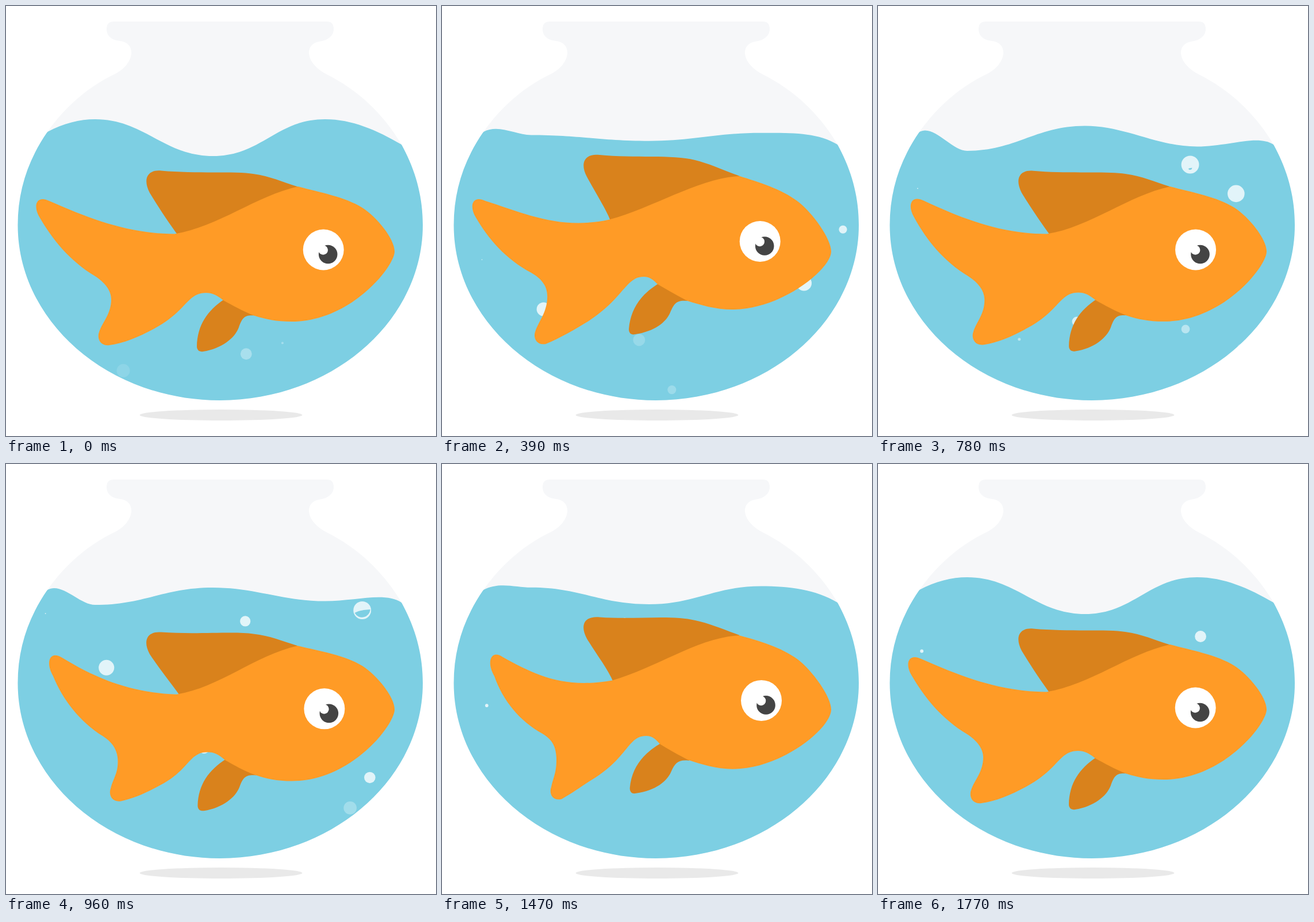
An HTML page that plays this animation: 748 by 748 pixels, repeating every 1.8 s.

```html
<!DOCTYPE html>
<html lang="en">
<head>
<meta charset="utf-8">
<title>Goldfish bowl</title>
<style>
  html, body { margin: 0; width: 100%; height: 100%; overflow: hidden; background: #fff; }
  svg { display: block; width: 100vw; height: 100vh; }
  .water { fill: #7dcfe3; }
  .fin { fill: #d9821c; }
  .body { fill: #ff9b26; }
</style>
</head>
<body>
<svg viewBox="0 0 748 748">
  <defs>
    <path id="bowl" d="M188 27H558Q570 27 570 40C570 52 560 60 544 62C533 64 527 72 527 81C527 96 541 110 558 119
      C610 145 655 185 688 241C712 285 725 330 725 381C725 549 566 686 372 686C178 686 20.5 549 20.5 381
      C20.5 322 38 268 72 219C106 171 148 138 188 119C205 111 218 96 218 81C218 70 211 63 200 61
      C185 60 175 53 175 40Q175 27 188 27Z"/>
    <clipPath id="inside"><use href="#bowl"/></clipPath>
  </defs>
  <ellipse cx="374" cy="711.5" rx="141.5" ry="9.5" fill="#e9e9e9"/>
  <use href="#bowl" fill="#f6f7f9"/>
  <g clip-path="url(#inside)">
    <path id="wave" class="water"/>
    <g id="bubbles"></g>
  </g>
  <path id="dorsal" class="fin"/>
  <path id="pelvic" class="fin"/>
  <path id="body" class="body"/>
  <g id="eye">
    <circle r="35.5" fill="#fff"/>
    <circle cx="8" cy="8" r="16.3" fill="#444"/>
    <circle cx="-.5" cy=".5" r="8.3" fill="#fff"/>
  </g>
</svg>
<script>
const LOOP = 1800, STEP = 30;
const $ = id => document.getElementById(id);
const clamp = (v, lo, hi) => Math.min(hi, Math.max(lo, v));

// Each shape: rest pose, then the poses it is blended towards.
const shapes = {
  wave: [
    'M72 219C100 204 128 197 155 197C240 197 275 261 360 261C445 261 470 197 555 197C602 197 645 216 688 241L748 300L748 748L0 748L0 300Z',
    'M72 219C97 205 128 254 155 254C240 254 275 206.5 360 206.5C430 206.5 485 246.3 555 246.3C610 246.3 661 223 688 241L748 300L748 748L0 748L0 300Z'
  ],
  // rest, raised, tail swept
  body: [
    `M75 339C150 372 215 396 293 396.5C370 384 435 330 508 314C545 324 590 332 620 351C645 367 676 405 676 427
     C676 453 600 549 497 549C470 549 452 545 433 539C410 530 395 521 378 512C368 504 360 499 348 499
     C315 499 315 530 260 560C235 574 205 587 180 590C163 592 158 577 162 567C168 549 183 536 183 510
     C183 495 172 481 155 470C110 443 80 405 58 367C46 346 54 329 75 339Z`,
    `M75 339C145 361 205 390 291 371.5C370 350 450 298 518 296C550 306 590 318 619 340C645 360 677 405 677 427
     C677 458 590 528 505 528C475 528 450 520 427 513C408 503 392 494 375 484C368 477 362 471 351 471
     C320 471 318 506 255 548C232 562 205 578 180 588C163 591 158 576 162 566C168 548 183 533 183 505
     C183 486 172 474 155 464C110 440 80 405 58 367C46 346 54 329 75 339Z`,
    `M106 336C165 377 220 398 298 402.5C373 390 432 334 507 317C545 326 590 333 620 351.5C645 367.5 676 405 676 427
     C676 455 600 552.5 498 552.5C471 552.5 453 548 435 542C413 534 398 525 382 516C372 507 364 502 352 502
     C319 502 322 532 272 558C250 570 230 580 208 585C191 588 186 573 190 563C194 545 199 540 199 520
     C199 500 191 486 174 475C135 450 106 412 91 369C76 343 86 322 106 336Z`
  ],
  dorsal: [
    'M300 400C285 380 265 350 250 325C237 300 247 284 270 286.5C330 292 400 287 430 292C460 296 480 306 508 314.5L400 400Z',
    'M294 376C288 358 270 330 252 297C239 272 249 256 274 259C335 265 400 258 440 268C465 274 490 286 518 296L420 375Z',
    'M305 406C285 378 265 355 250 333C237 309 246 293 270 295C330 299 400 292 430 297C460 300 480 309 507 317L400 405Z'
  ],
  pelvic: [
    'M380 510C350 530 333 555 332 592C332 599 337 602 343 601C375 596 398 578 405 559C411 542 415 537 433 538.5L430 505Z',
    'M378 482C348 500 328 525 325 562C325 570 330 572.5 336 571C370 566 390 550 397 533C404 517 408 511 427 513L425 480Z',
    'M384 514C354 533 335 558 334 595C334 602 339 605 345 604C377 599 400 581 407 562C413 546 418 541 436 542.5L434 508Z'
  ]
};
const NUMBER = /\d+(\.\d+)?/g;
const parsed = {};
for (const id in shapes) parsed[id] = shapes[id].map(d => d.match(NUMBER).map(Number));

function pose(id, ...weights) {
  const [rest, ...ends] = parsed[id];
  let i = 0;
  const d = shapes[id][0].replace(NUMBER, () => {
    const v = ends.reduce((sum, end, k) => sum + weights[k] * (end[i] - rest[i]), rest[i]);
    i++;
    return v.toFixed(2) + ' ';
  });
  $(id).setAttribute('d', d);
}

// Smooth curve through [time, value] keys, without overshoot.
function curve(keys) {
  const slope = i => (keys[i + 1][1] - keys[i][1]) / (keys[i + 1][0] - keys[i][0]);
  const tangent = i => {
    if (i === 0 || i === keys.length - 1) return 0;
    const a = slope(i - 1), b = slope(i);
    if (a * b <= 0) return 0;
    return Math.sign(a) * Math.min(Math.abs(a + b) / 2, 3 * Math.abs(a), 3 * Math.abs(b));
  };
  return t => {
    const n = keys.findIndex(k => k[0] > t);
    if (n < 0) return keys[keys.length - 1][1];
    const [t0, v0] = keys[n - 1], [t1, v1] = keys[n];
    const h = t1 - t0, p = (t - t0) / h, q = 1 - p;
    return v0 * q * q * (1 + 2 * p) + v1 * p * p * (3 - 2 * p)
      + h * p * q * (tangent(n - 1) * q - tangent(n) * p);
  };
}
const lift = curve([[0, 0], [50, 0], [390, 1], [450, 1.03], [780, .03], [870, 0], [960, 0],
  [1200, .68], [1350, 1.08], [1470, 1.04], [1770, 0]]);
const sweep = curve([[0, 0], [202, 1.1], [390, .01], [405, 0], [607, 1.1], [780, .14], [810, .08],
  [960, .72], [1050, 1.1], [1200, .14], [1290, 0], [1470, 1], [1530, 1.1], [1770, 0]]);

// start, end, x, y, end x, end y, radius, end radius
const bubbles = [
  [-10, 390, 204.7, 637, 177, 528, 11.5, 12],
  [0, 1290, 178, 646, 173.6, 254, 11, 14.4],
  [-115, 1080, 418, 645, 416, 232, 10, 9],
  [-100, 800, 481, 617, 480, 340, 2, 2],
  [60, 690, 698, 493, 697, 294, 5, 9],
  [30, 1000, 636, 626, 619, 238.5, 12, 15.6],
  [340, 1500, 344, 595, 317, 269, 10.5, 10],
  [320, 1200, 400, 689, 398, 420, 7.5, 8],
  [480, 1200, 348, 639, 343, 423, 8, 9],
  [130, 850, 548, 536, 542.5, 248, 14, 15.6],
  [600, 1500, 535.5, 610, 533, 370, 7, 9],
  [590, 1300, 246, 638, 245, 420, 2.5, 2.5],
  [60, 1080, 70, 546, 68.5, 222, .7, 1],
  [620, 1500, 634, 642, 631, 392, 9, 11],
  [870, 1700, 598, 620, 604, 420, 11, 14],
  [900, 1800, 81, 600, 76, 316, 2.5, 3],
  [1250, 1800, 562, 456, 561, 291, 8, 10]
];
const SVG = 'http://www.w3.org/2000/svg';
const add = (parent, tag, attrs) => {
  const el = parent.appendChild(document.createElementNS(SVG, tag));
  for (const k in attrs) el.setAttribute(k, attrs[k]);
  return el;
};
const nodes = bubbles.map(() => {
  const group = add($('bubbles'), 'g');
  const disc = add(group, 'circle', { r: 1, fill: '#fff' });
  const pop = add(group, 'path', { class: 'water', d: 'M-.85 .3Q-.3 -.05 .9 -.1A.93 .93 0 0 1 -.85 .3Z' });
  return { group, disc, pop };
});

function drawBubble([t0, t1, x0, y0, x1, y1, r0, r1], { group, disc, pop }, rank, t) {
  // The second bubble takes over where the first one ends.
  const shown = t >= (rank === 1 ? bubbles[0][1] : t0) && t < t1;
  group.setAttribute('display', shown ? 'inline' : 'none');
  if (!shown) return;
  const p = (t - t0) / (t1 - t0), mix = (a, b) => a + (b - a) * p;
  const r = mix(r0, r1);
  group.setAttribute('transform', `translate(${mix(x0, x1)} ${mix(y0, y1)}) scale(${r})`);
  disc.setAttribute('opacity', clamp(.1 + .002 * (t - t0), 0, .78));
  const burst = r > 12 ? clamp((t - t1 + 80) / 40, 0, 1) : 0;
  pop.setAttribute('transform', `translate(0 ${.5 * (1 - burst)}) scale(${burst})`);
}

function draw(now) {
  const t = Math.floor((now % LOOP) / STEP) * STEP;
  const up = lift(t), tail = sweep(t);
  pose('wave', t < 810 ? t / 810 : clamp((1770 - t) / 960, 0, 1));
  for (const id of ['dorsal', 'pelvic', 'body']) pose(id, up, tail);
  $('eye').setAttribute('transform', `translate(${552.2 + up + 2.3 * tail} ${424 - 14.6 * up + 2.6 * tail})`);
  bubbles.forEach((b, i) => drawBubble(b, nodes[i], i, t));
}

function tick() {
  draw(performance.now());
  requestAnimationFrame(tick);
}
tick();
</script>
</body>
</html>
```
